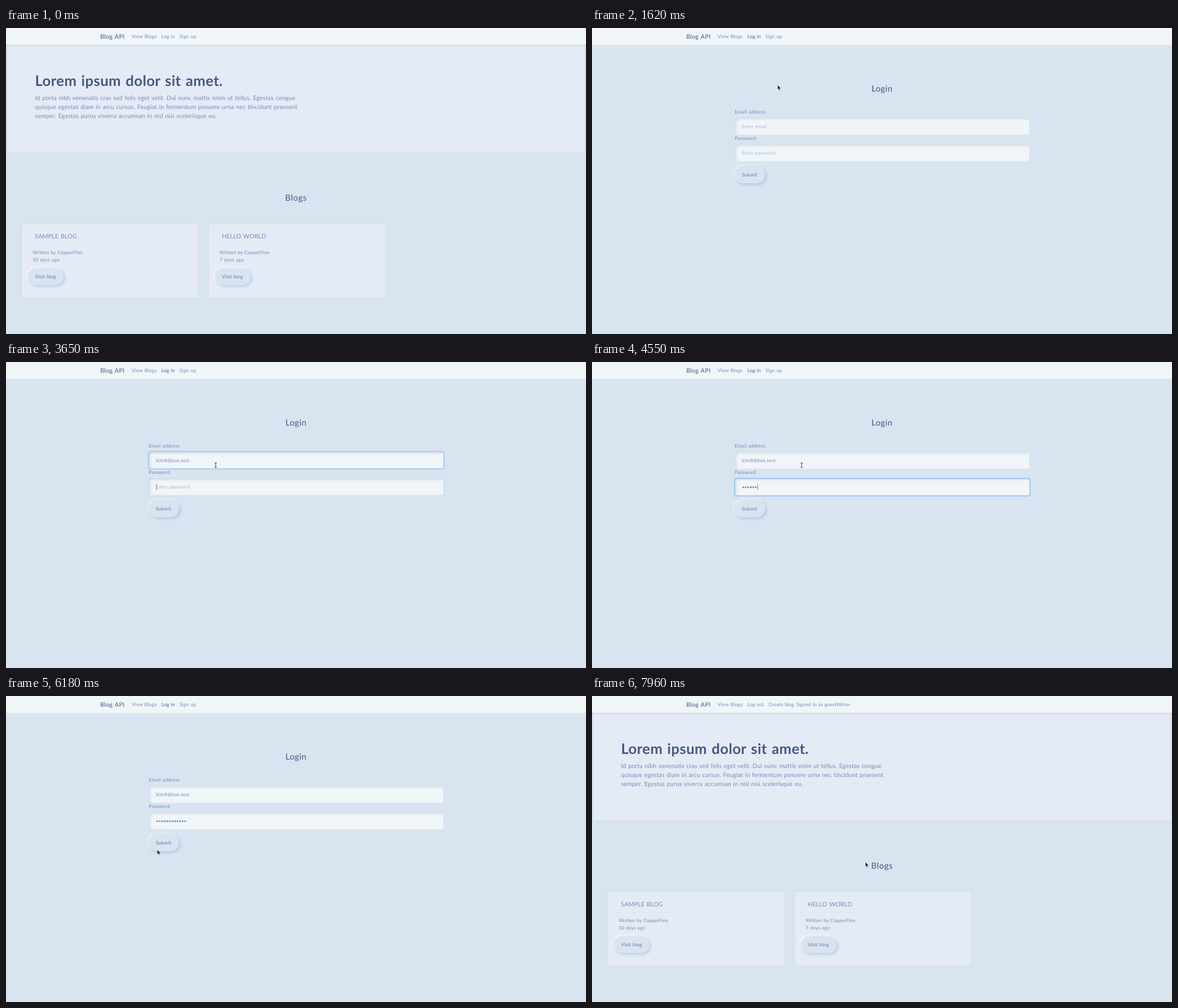
Write an HTML page that moves like this. It is 1029 by 544 pixels and loops after 8 s.

```html
<!DOCTYPE html>
<html lang="en">
<head>
<meta charset="utf-8">
<title>Blog API</title>
<style>
  html, body { margin: 0; width: 100%; height: 100%; overflow: hidden; background: #d8e4f0; }
  div { position: absolute; box-sizing: border-box; }
  svg { position: absolute; left: 0; top: 0; }
  text { font-family: Lato, "Open Sans", sans-serif; fill: #7b8ab8; word-spacing: .065em; white-space: pre;
    text-rendering: geometricPrecision; }
  .head { fill: #485785; }
  .nav { background: #f0f5f8; }
  .hero { background: #e4ebf5; box-shadow: inset 0 .5px 3px rgba(70,100,125,.2), inset 0 0 5px rgba(70,100,125,.12); }
  .card { background: #e4ebf5; border-radius: 4px;
    box-shadow: inset 1px 1px 3px rgba(70,100,125,.14), inset -1px -1px 3px rgba(255,255,255,.25); }
  .rule { background: #dbe4f0; }
  .btn { background: #d8e4f0; border-radius: 16px;
    box-shadow: 2.7px 2.7px 5px rgba(55,94,148,.2), -2.7px -2.7px 5px rgba(255,255,255,.4); }
  .field { background: #f0f5f8; border-radius: 3px;
    box-shadow: inset 1.5px 1.5px 4px rgba(55,94,148,.22), inset -1.5px -1px 5px rgba(255,255,255,.5); }
  .ring { border: 2px solid #a6c8f5; border-radius: 4px; box-shadow: 0 0 1px #a6c8f5; }
</style>
</head>
<body>
<script>
const LOOP = 8000;
const NS = 'http://www.w3.org/2000/svg';

function box(parent, cls, x, y, w, h) {
  const el = document.createElement('div');
  el.className = cls;
  el.style.cssText = `left:${x}px;top:${y}px;width:${w}px;height:${h}px`;
  parent.append(el);
  return el;
}

function node(parent, tag, attrs = {}) {
  const el = document.createElementNS(NS, tag);
  for (const key in attrs) el.setAttribute(key, attrs[key]);
  parent.append(el);
  return el;
}

function label(parent, x, y, size, str, gap = .015, attrs = {}) {
  const el = node(parent, 'text', { x, y, 'font-size': size, 'letter-spacing': gap * size, ...attrs });
  el.textContent = str;
  return el;
}

const HEAD = { class: 'head' };
const MID_HEAD = { class: 'head', 'text-anchor': 'middle' };
const SEMI = { 'font-weight': 600 };
const SMALL = 8.57, LARGE = 10.72;

box(document.body, 'nav', 0, 0, 1029, 30);
const boxes = {}, labels = {};
for (const name of ['blog', 'login', 'account']) boxes[name] = box(document.body, 'page', 0, 0, 1029, 544);
const svg = node(document.body, 'svg', { width: 1029, height: 544 });
for (const name of ['blog', 'login', 'account', 'guest', 'member']) labels[name] = node(svg, 'g');

function button(page, x, y, w, h, str, gap) {
  box(boxes[page], 'btn', x, y, w, h);
  label(labels[page], x + 12.6, y + h / 2 + 2.9, SMALL, str, gap, SEMI);
}

// Navigation
label(svg, 167.2, 18.9, LARGE, 'Blog API', .03, HEAD);
label(svg, 222.8, 17.9, SMALL, 'View Blogs', .03);
const logIn = label(labels.guest, 275.8, 17.9, SMALL, 'Log in', .02);
label(labels.guest, 307.8, 17.9, SMALL, 'Sign up', .025);
label(labels.member, 275.8, 17.9, SMALL, 'Log out', .005);
label(labels.member, 313.4, 17.9, SMALL, 'Create blog');
label(labels.member, 362.5, 17.9, SMALL, 'Signed in as guestWriter');

// Blog list
box(boxes.blog, 'hero', 0, 30, 1029, 194);
label(labels.blog, 51.5, 103.2, 25.72, 'Lorem ipsum dolor sit amet.', .0145, { class: 'head', 'font-weight': 700 });
[
  'Id porta nibh venenatis cras sed felis eget velit. Dui nunc mattis enim ut tellus. Egestas congue',
  'quisque egestas diam in arcu cursus. Feugiat in fermentum posuere urna nec tincidunt praesent',
  'semper. Egestas purus viverra accumsan in nisl nisi scelerisque eu.'
].forEach((line, i) => label(labels.blog, 51.5, 127.9 + i * 16.08, LARGE, line, .011));
label(labels.blog, 514.6, 306.8, 15, 'Blogs', .035, MID_HEAD);

function card(x, title, age, gap) {
  box(boxes.blog, 'card', x, 345.5, 314.5, 133.5);
  box(boxes.blog, 'rule', x + 12.5, 383.5, 289, 1);
  label(labels.blog, x + 25.3, 374.3, LARGE, title);
  label(labels.blog, x + 21.2, 402, SMALL, 'Written by CopperFinn', .005);
  label(labels.blog, x + 21.2, 414.9, SMALL, age, gap);
  button('blog', x + 12.9, 427.3, 63, 30, 'Visit blog');
}
card(26, 'SAMPLE BLOG', '10 days ago', .02);
card(357.6, 'HELLO WORLD', '7 days ago', .03);

// Login form
label(labels.login, 514.5, 112.6, 15, 'Login', .025, MID_HEAD);

function field(y, name, hint) {
  box(boxes.login, 'field', 253.5, y, 522.5, 29.7);
  const ring = box(boxes.login, 'ring', 252, y - 1.7, 525.5, 33);
  label(labels.login, 253.2, y - 8.3, SMALL, name, .029);
  return { ring, hint: label(labels.login, 266, y + 17.6, SMALL, hint, .015, { opacity: .55 }) };
}
const email = field(160, 'Email address', 'Enter email');
const pass = field(207.3, 'Password', 'Enter password');
button('login', 253.3, 246, 54, 29.7, 'Submit');

const ADDRESS = 'kite8@box.test';
const typed = label(labels.login, 266, 177.6, SMALL, '', .03);
const dots = Array.from({ length: 12 }, (_, i) =>
  node(labels.login, 'circle', { cx: 268.3 + i * 4.5, cy: 222.6, r: 1.6, fill: '#7b8ab8' }));
const caret = node(labels.login, 'rect', { width: .8, height: 11.5, fill: '#5d6b94' });

// Signed-in page
label(labels.account, 514.5, 258.5, SMALL, 'You are currently signed in as guestWriter', .006, { 'text-anchor': 'middle' });
button('account', 447.6, 270.6, 70, 30, 'View blogs', .025);
button('account', 526.2, 270.6, 55.2, 30, 'Log out', .01);

// Pointers, each with its hot spot at 0,0
const pointers = {
  arrow: node(svg, 'path', { d: 'M0 0V8.6L2 6.9 3.3 9.8 4.8 9.1 3.5 6.3H6.1Z',
    fill: '#111', stroke: '#fff', 'stroke-width': .6 }),
  hand: node(svg, 'path', { d: 'M-1 .8Q0-.9 1 .8V4Q2 3.1 2.9 4.2 3.9 3.5 4.6 4.6 6 4.3 6 5.8V7.6L5 10.4H-.8L-3.3 6.8Q-3.6 5.2-2.2 5.6L-1 6.8Z',
    fill: '#fff', stroke: '#222', 'stroke-width': .9, 'stroke-linejoin': 'round' }),
  beam: node(svg, 'path', { d: 'M-2-4H-.8L0-3.4.8-4H2M0-3.4V3.4M-2 4H-.8L0 3.4.8 4H2',
    fill: 'none', stroke: '#333', 'stroke-width': 1 })
};

// Pointer route: time, x, y, shape from then on
const route = [
  [420, 999, 159, 'arrow'], [580, 800, 118, 'arrow'], [820, 440, 48, 'arrow'], [980, 264, 25, 'arrow'],
  [1140, 282, 16, 'hand'], [1220, 285, 13.5, 'hand'], [1380, 285, 13.5, 'hand'], [1460, 288, 24, 'arrow'],
  [1700, 350, 140, 'arrow'], [1780, 372, 183.4, 'beam'], [5460, 372, 183.4, 'beam'], [5540, 366, 195, 'arrow'],
  [5780, 281, 264, 'hand'], [6020, 279, 266, 'hand'], [6180, 268.3, 273, 'arrow'], [6340, 269, 273, 'arrow'],
  [6660, 337, 134, 'arrow'], [6740, 340, 130, 'arrow'], [6910, 340, 130, 'arrow'], [6990, 352, 146, 'arrow'],
  [7150, 448, 275, 'arrow'], [7230, 471.8, 303.2, 'arrow'], [7310, 471.8, 303.2, 'arrow'],
  [7390, 476, 298, 'hand'], [7550, 485, 295.2, 'hand'], [7720, 485, 295.2, 'arrow'], [LOOP, 485, 295.2, 'arrow']
];
const emailKeys = [1940, 2100, 2180, 2340, 2510, 2680, 2920, 2920, 3000, 3170, 3250, 3330, 3410, 3570];
const passKeys = [3810, 3970, 4050, 4300, 4550, 4550, 4710, 4790, 5040, 5120, 5200, 5280];

const LOGIN_AT = 1380, FOCUS_AT = 1860, TAB_AT = 3600, BLUR_AT = 5860, ACCOUNT_AT = 6340, LIST_AT = 7720;

const count = (keys, t) => keys.filter(k => k <= t).length;
const ramp = (t, from) => Math.max(0, Math.min(1, (t - from) / 150));
const show = (el, on) => { el.style.display = on ? '' : 'none'; };

// The screen refreshes every 80 ms
function snap(t) {
  const phase = t < 6900 ? 20 : 30;
  return Math.floor((t - phase) / 80) * 80 + phase;
}

function drawPointer(t) {
  const i = route.findLastIndex(p => p[0] <= t);
  for (const name in pointers) show(pointers[name], i >= 0 && route[i][3] === name);
  if (i < 0) return;
  const a = route[i], b = route[Math.min(i + 1, route.length - 1)];
  const u = b === a ? 0 : (t - a[0]) / (b[0] - a[0]);
  const x = a[1] + (b[1] - a[1]) * u, y = a[2] + (b[2] - a[2]) * u;
  pointers[a[3]].setAttribute('transform', `translate(${x} ${y})`);
}

function drawForm(t, step) {
  const letters = count(emailKeys, t), marks = count(passKeys, t);
  typed.textContent = ADDRESS.slice(0, letters);
  show(email.hint, !letters);
  show(pass.hint, !marks);
  dots.forEach((dot, i) => show(dot, i < marks));

  const moved = ramp(step, TAB_AT);
  email.ring.style.opacity = (step >= FOCUS_AT ? 1 : 0) * (1 - moved);
  pass.ring.style.opacity = moved * (1 - ramp(step, BLUR_AT));

  const inPass = t >= TAB_AT;
  show(caret, step >= FOCUS_AT && step < BLUR_AT);
  caret.setAttribute('x', inPass ? 266.6 + marks * 4.5 : 266 + (letters ? typed.getComputedTextLength() : 0));
  caret.setAttribute('y', inPass ? 216.4 : 169);
}

function render(t) {
  const step = snap(t);
  const page = t < LOGIN_AT || t >= LIST_AT ? 'blog' : t < ACCOUNT_AT ? 'login' : 'account';
  for (const name in boxes) {
    show(boxes[name], name === page);
    show(labels[name], name === page);
  }
  show(labels.guest, t < ACCOUNT_AT);
  show(labels.member, t >= ACCOUNT_AT);
  logIn.style.fill = t >= 1140 ? '#485785' : '#7b8ab8';
  if (page === 'login') drawForm(t, step);
  drawPointer(step);
}

const start = performance.now();
function tick() {
  render((performance.now() - start) % LOOP);
  requestAnimationFrame(tick);
}
tick();
</script>
</body>
</html>
```
